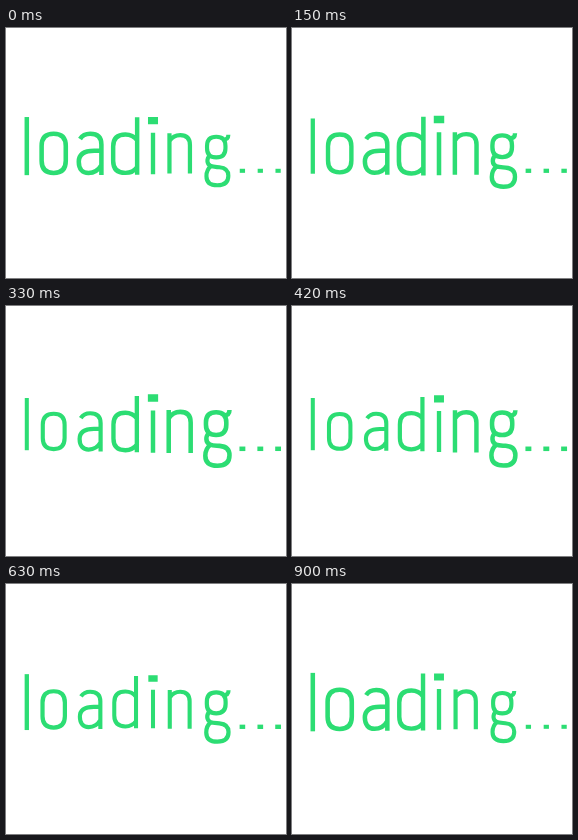
An HTML page that plays this animation: 280 px wide and 250 px high, repeating every 0.93 s.

```html
<!DOCTYPE html>
<html lang="en">
<head>
<meta charset="utf-8">
<title>loading...</title>
<style>
  html, body { margin: 0; width: 100%; height: 100%; overflow: hidden; background: #fff; }
  svg { display: block; width: 280px; height: 250px; }
  path { fill: none; stroke: #2cdd73; stroke-width: 4.3; }
</style>
</head>
<body>
<svg viewBox="0 0 280 250" role="img" aria-label="loading..."></svg>
<script>
  const LOOP = 930, STEP = 30, SWING = 0.06;
  const dot = (x, y) => `M${x - 2.8} ${y}h5.6`;

  // Each glyph: centre x, centre y, time of its largest size, outline.
  const glyphs = [
    [20.8, 118.2, 840, 'M20.8 90.4V145.8'],
    [47.7, 125.4, 910, 'M36.3 118.4C36.3 110.8 40.2 106.9 47.7 106.9S59.1 110.8 59.1 118.4V132.4C59.1 140 55.2 143.9 47.7 143.9S36.3 140 36.3 132.4Z'],
    [84.3, 125.4, 50, 'M74.6 111.8C76.6 108.6 79.8 106.9 84.2 106.9C91.4 106.9 94.8 110.4 94.8 117V145.8M94.8 122.8H88C78 122.8 73.4 126.2 73.4 133.2C73.4 140 76.8 143.9 82.6 143.9C88 143.9 92.2 141 94.8 136.5'],
    [119.1, 118.2, 130, 'M130.7 90.4V145.8M130.7 112.5C128 108.8 124.2 106.9 119.4 106.9C111.6 106.9 107.6 110.8 107.6 118.4V132.4C107.6 140 111.6 143.9 119.4 143.9C124.2 143.9 128 142 130.7 138.3'],
    [147, 118.2, 200, dot(147, 93) + 'M147 105V145.8'],
    [173.7, 125.4, 270, 'M163.3 105V145.8M163.3 113C165.8 109 169.6 106.9 174.2 106.9C181 106.9 184.1 110.4 184.1 117V145.8'],
    [211.3, 133, 340, 'M200.6 117.4C200.6 111 203.8 107.8 210.2 107.8S219.8 111 219.8 117.4V119.6C219.8 126 216.6 129.2 210.2 129.2S200.6 126 200.6 119.6ZM217 110.8C221 110.8 222.8 109.4 222.8 105.6M203.6 127.2C200 130.4 200 136.2 204.4 138.2C207 139.4 210.5 139.2 213.5 139.5C219.8 140 222.8 143.2 222.8 148.4C222.8 155 219 158.3 211.4 158.3S200 155 200 148.8C200 144.2 201.6 140.8 204.8 138.4'],
    [236.4, 142.8, 400, dot(236.4, 142.8)],
    [254.3, 142.8, 430, dot(254.3, 142.8)],
    [272.1, 142.8, 460, dot(272.1, 142.8)]
  ];

  const svg = document.querySelector('svg');
  const paths = glyphs.map(([, , , d]) => {
    const path = document.createElementNS(svg.namespaceURI, 'path');
    // Dots are short strokes, thickened into squares.
    if (d.length < 16) path.style.strokeWidth = 5.6;
    path.setAttribute('d', d.replace(/^(M147 93|M144.*?h5.6)/, 'M144.2 91.6h5.6v2.8h-5.6z'));
    return svg.appendChild(path);
  });

  function draw(now) {
    const t = Math.floor((now % LOOP) / STEP) * STEP;
    glyphs.forEach(([x, y, peak], i) => {
      const s = 1 + SWING * Math.cos((t - peak) / LOOP * 2 * Math.PI);
      paths[i].setAttribute('transform', `translate(${x} ${y}) scale(${s}) translate(${-x} ${-y})`);
    });
  }

  const start = performance.now();
  function tick() {
    draw(performance.now() - start);
    requestAnimationFrame(tick);
  }
  tick();
</script>
</body>
</html>
```
